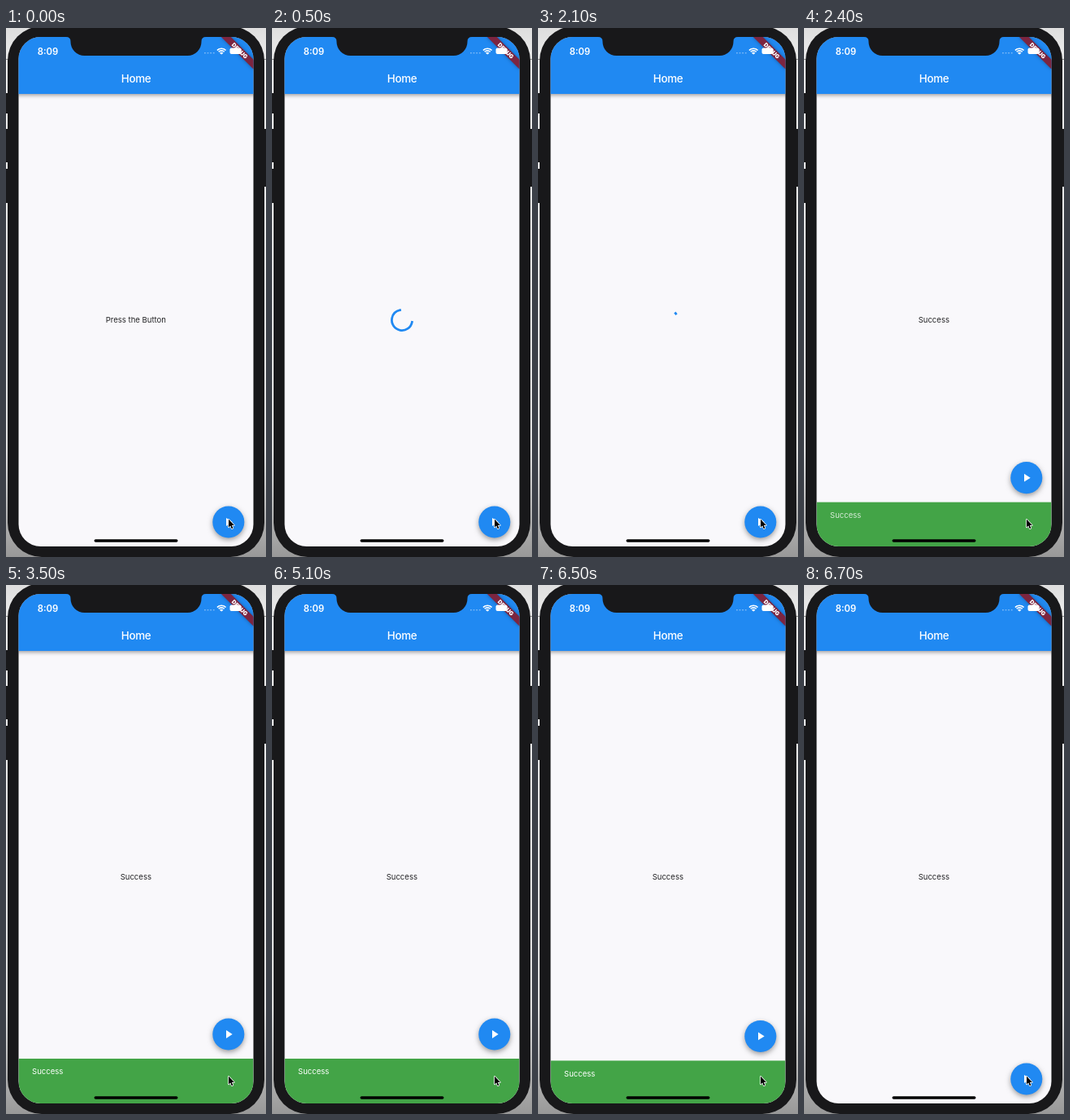
An HTML page with a canvas for the animation above (6.8 s loop, 320x650 px).

```html
<!DOCTYPE html>
<html lang="en">
<head>
<meta charset="utf-8">
<title>Button demo</title>
<style>
html, body { margin: 0; width: 100%; height: 100%; overflow: hidden; background: #eee; }
canvas { display: block; width: 320px; height: 650px; }
</style>
</head>
<body>
<canvas id="stage"></canvas>
<script>
const W = 320, H = 650, LOOP = 6800, TICK = 100;
const LOAD_AT = 170, DONE_AT = 2170;
const SNACK_IN = 2185, SNACK_OUT = 6435, SLIDE = 250;
const BLUE = '#2089f2', BEZEL = '#18181a', GREEN = '#43a447';
const DP = 0.698; // one logical pixel on the stage
const SCREEN = { x: 15.5, y: 11, w: 289, h: 626, r: 27 };
const BOTTOM = SCREEN.y + SCREEN.h;
const RIGHT = SCREEN.x + SCREEN.w;

const canvas = document.getElementById('stage');
const ctx = canvas.getContext('2d');
const dpr = window.devicePixelRatio || 1;
canvas.width = W * dpr;
canvas.height = H * dpr;

const clamp = v => Math.min(1, Math.max(0, v));

// cubic-bezier(.4, 0, .2, 1)
function ease(x) {
  if (x <= 0 || x >= 1) return clamp(x);
  let lo = 0, hi = 1, s = 0.5;
  for (let i = 0; i < 24; i++) {
    s = (lo + hi) / 2;
    const u = 1 - s;
    if (1.2 * u * u * s + 0.6 * u * s * s + s * s * s < x) lo = s; else hi = s;
  }
  return s * s * (3 - 2 * s);
}

function rect(x, y, w, h, color) {
  ctx.fillStyle = color;
  ctx.fillRect(x, y, w, h);
}

function roundPath(x, y, w, h, r) {
  ctx.beginPath();
  ctx.roundRect(x, y, w, h, r);
}

function poly(points, color) {
  ctx.beginPath();
  points.forEach(([x, y]) => ctx.lineTo(x, y));
  ctx.closePath();
  ctx.fillStyle = color;
  ctx.fill();
}

function text(str, x, y, size, weight, color, align = 'center', spacing = 0) {
  ctx.font = `${weight} ${size}px Inter, Roboto, sans-serif`;
  ctx.letterSpacing = spacing + 'px';
  ctx.textAlign = align;
  ctx.textBaseline = 'alphabetic';
  ctx.fillStyle = color;
  ctx.fillText(str, x, y);
}

function shadow(color, blur, dy) {
  ctx.shadowColor = color;
  ctx.shadowBlur = blur * dpr;
  ctx.shadowOffsetY = dy * dpr;
}

function drawPhone() {
  const bg = ctx.createLinearGradient(0, 0, 0, H);
  bg.addColorStop(0, '#dedede');
  bg.addColorStop(0.06, '#ececec');
  bg.addColorStop(0.8, '#e2e2e2');
  bg.addColorStop(1, '#989898');
  rect(0, 0, W, H, bg);
  rect(0, 38, W, 1, '#8a8a8a');
  for (const [y, h] of [[80, 25], [124, 41], [173, 42]]) rect(0, y, 4, h, BEZEL);
  rect(316, 124, 4, 71, BEZEL);
  roundPath(2, -2, 316, 652, 42);
  ctx.fillStyle = BEZEL;
  ctx.fill();
}

function drawAppBar() {
  ctx.save();
  shadow('rgba(0,0,0,.4)', 5, 1.5);
  rect(SCREEN.x - 10, 0, SCREEN.w + 20, 81, BLUE);
  ctx.restore();
  text('Home', 160, 66.6, 13.4, 500, '#fff', 'center', -0.35);
}

function drawBanner() {
  ctx.save();
  ctx.translate(RIGHT, SCREEN.y);
  ctx.rotate(Math.PI / 4);
  ctx.save();
  shadow('rgba(0,0,0,.35)', 4, 0);
  rect(-28, 19.6, 56, 8.4, '#7c2540');
  ctx.restore();
  ctx.restore();
}

function drawBannerLabel() {
  ctx.save();
  ctx.translate(RIGHT, SCREEN.y);
  ctx.rotate(Math.PI / 4);
  text('DEBUG', 0, 26.4, 7, 900, '#fff');
  ctx.restore();
}

function drawStatus() {
  text('8:09', 51.5, 33, 11.3, 600, '#fff');
  for (let i = 0; i < 4; i++) rect(244 + i * 3.6, 30, 1.8, 1.4, 'rgba(255,255,255,.4)');

  ctx.save();
  ctx.beginPath();
  ctx.moveTo(265.2, 32.8);
  ctx.arc(265.2, 32.8, 8.6, -Math.PI * 0.75, -Math.PI * 0.25);
  ctx.clip();
  ctx.strokeStyle = '#fff';
  ctx.lineWidth = 1.7;
  for (const r of [7.6, 4.9]) {
    ctx.beginPath();
    ctx.arc(265.2, 32.8, r, Math.PI, 0);
    ctx.stroke();
  }
  ctx.beginPath();
  ctx.arc(265.2, 32.8, 3, Math.PI, 0);
  ctx.fillStyle = '#fff';
  ctx.fill();
  ctx.restore();

  roundPath(275.5, 24.5, 14, 7.5, 2);
  ctx.fillStyle = '#fff';
  ctx.fill();
}

function drawNotch() {
  ctx.beginPath();
  ctx.moveTo(74, 10);
  ctx.lineTo(74, 11);
  ctx.quadraticCurveTo(79.5, 11, 79.5, 16.5);
  ctx.arcTo(79.5, 34, 97, 34, 17);
  ctx.arcTo(240.5, 34, 240.5, 16, 17);
  ctx.lineTo(240.5, 16.5);
  ctx.quadraticCurveTo(240.5, 11, 246, 11);
  ctx.lineTo(246, 10);
  ctx.fillStyle = BEZEL;
  ctx.fill();
}

function drawSpinner(ms) {
  const turns = ms / 1000, step = Math.floor(turns), part = turns - step;
  const head = ease(part * 2), tail = ease(part * 2 - 1);
  const start = Math.PI * (-0.5 + 1.5 * tail + 1.7 * part - 0.8 * step);
  const sweep = Math.max(1.5 * Math.PI * (head - tail), 0.001);
  ctx.beginPath();
  ctx.arc(160, 359, 18 * DP, start, start + sweep);
  ctx.strokeStyle = BLUE;
  ctx.lineWidth = 4 * DP;
  ctx.lineCap = 'square';
  ctx.stroke();
}

function drawContent(t) {
  if (t >= LOAD_AT && t < DONE_AT) drawSpinner(t - LOAD_AT);
  else text(t < LOAD_AT ? 'Press the Button' : 'Success', 159.8, 362.4, 9.55, 400, '#242426');
}

function drawSnack(top, alpha) {
  if (top >= BOTTOM) return;
  rect(SCREEN.x, top, SCREEN.w, BOTTOM - top + 1, GREEN);
  ctx.globalAlpha = alpha;
  text('Success', 32, top + 19.1, 9.55, 400, '#fff', 'left');
  ctx.globalAlpha = 1;
}

function drawButton(y) {
  const x = 273.8;
  ctx.save();
  shadow('rgba(0,0,0,.38)', 6, 2.5);
  ctx.beginPath();
  ctx.arc(x, y, 28 * DP, 0, Math.PI * 2);
  ctx.fillStyle = BLUE;
  ctx.fill();
  ctx.restore();
  poly([[x - 4 * DP, y - 7 * DP], [x + 7 * DP, y], [x - 4 * DP, y + 7 * DP]], '#fff');
}

function drawCursor() {
  ctx.save();
  ctx.translate(274, 603.8);
  const arrow = [[0, 0], [0, 9.8], [2.2, 7.7], [3.8, 11.4], [5.4, 10.7], [3.8, 7.1], [6.9, 7.1]];
  ctx.lineJoin = 'round';
  ctx.lineWidth = 1.5;
  ctx.strokeStyle = '#fff';
  poly(arrow, '#000');
  ctx.stroke();
  poly(arrow, '#000');
  ctx.restore();
}

function draw(t) {
  const leaving = t >= SNACK_OUT;
  const shown = leaving ? 1 - clamp((t - SNACK_OUT) / SLIDE) : clamp((t - SNACK_IN) / SLIDE);
  const top = BOTTOM - 55 * ease(shown);
  const alpha = leaving ? 1 : ease((shown - 0.72) / 0.28);

  ctx.setTransform(dpr, 0, 0, dpr, 0, 0);
  drawPhone();
  ctx.save();
  roundPath(SCREEN.x, SCREEN.y, SCREEN.w, SCREEN.h, SCREEN.r);
  ctx.clip();
  rect(0, 0, W, H, '#f9f8fb');
  drawContent(t);
  drawAppBar();
  drawSnack(top, alpha);
  drawButton(top - 30);
  drawBanner();
  drawStatus();
  drawBannerLabel();
  roundPath(108.5, 628.2, 103, 3.6, 1.8);
  ctx.fillStyle = '#000';
  ctx.fill();
  ctx.restore();
  drawNotch();
  drawCursor();
}

const began = performance.now();
function frame() {
  const t = (performance.now() - began) % LOOP;
  draw(Math.floor(t / TICK) * TICK);
  requestAnimationFrame(frame);
}
frame();
</script>
</body>
</html>
```
